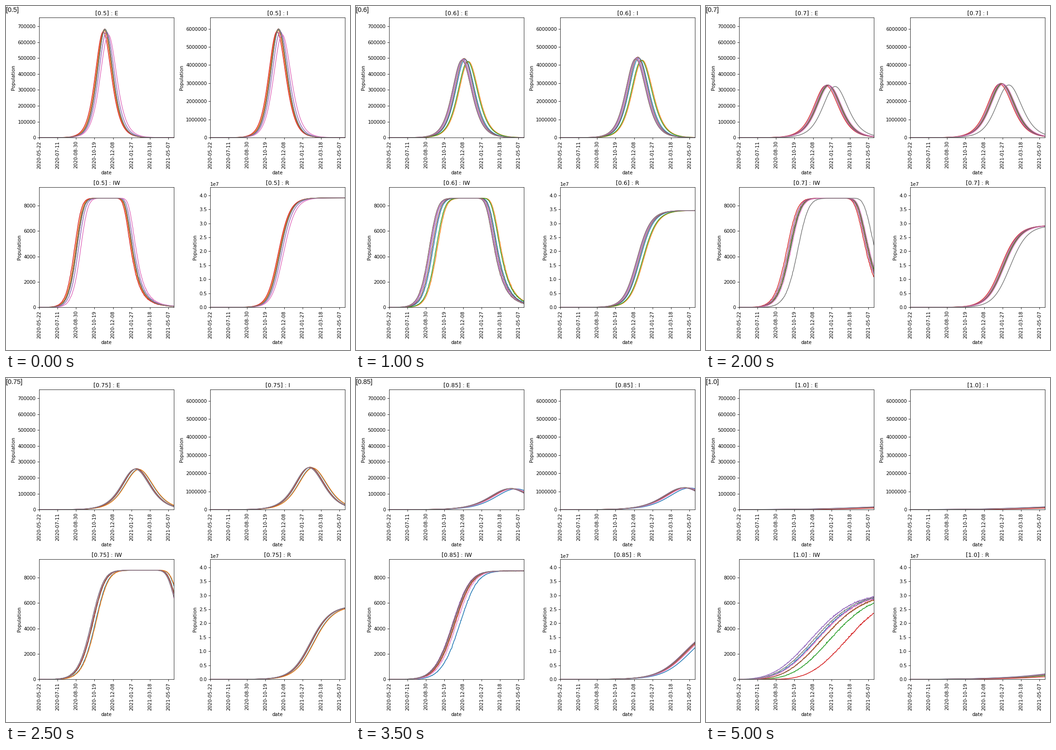
These frames come from a looping animation (748x748 px, 5.5 s). A matplotlib script:

```python
import numpy as np
import matplotlib.pyplot as plt
from matplotlib.animation import FuncAnimation

SIZE, DPI = 748, 74.8
POP, WARDS, RUNS = 56.08e6, 8588, 8
DAYS = np.arange(366)
LEVELS = np.round(np.linspace(0.5, 1.0, 11), 2)
PANELS = [("E", 755e3, 1e5), ("I", 6.62e6, 1e6), ("IW", 9448, 2000), ("R", 4.288e7, 5e6)]


def epidemic(r0, step=0.25, count=6400, sick=9.2):
    """SEIR with two infectious stages; returns time, E, I and R."""
    s, e, i1, i2, r = 1 - 2e-6, 1e-6, 1e-6, 0.0, 0.0
    out = np.empty((3, count))
    rate = 2 / sick
    for n in range(count):
        out[:, n] = e, i1 + i2, r
        new = r0 / sick * s * (i1 + i2)
        left, healed = rate * i1, rate * i2
        s -= step * new
        i1 += step * (e - left)
        e += step * (new - e)
        i2 += step * (left - healed)
        r += step * healed
    return np.arange(count) * step, out * POP


def saturate(x):
    """Rises from 0 to 1, a half at x = 1, with a sharp shoulder."""
    return 1 - (1 + 0.26 * x) ** -3


def wards(q, peak, delay, rng):
    """Number of wards with at least one infection."""
    lead = 300 * (0.5 - q)
    half = 0.56 * peak * (1 - 1.33 * q ** 3) + lead
    power = 0.81 * (0.095 - 0.153 * q) * half
    t = np.maximum(DAYS - 1.2 * delay, 0.5)
    rise = saturate(((t + lead) / half) ** power)
    after = np.maximum(DAYS - peak - delay, 1)
    fall = saturate(((0.43 + 0.15 * q) * peak / after) ** 5)
    share = rise * fall * (1 - 0.2 * (2 * q) ** 10)
    noise = rng.normal(0, 55, DAYS.size) * np.sqrt(share * (1 - share))
    return np.maximum(WARDS * share + noise, 0)


def simulate(level):
    """All runs of one level as an array [run, panel, day]."""
    q = level - 0.5
    rng = np.random.default_rng(int(100 * level))
    time, (e, i, r) = epidemic(1.71 - 1.65 * q + 0.82 * q ** 2)
    height = 684e3 * (1 - 2.764 * q + 0.505 * q ** 2 + 2.325 * q ** 3)
    scale, top = height / e.max(), time[e.argmax()]
    peak = 178 * np.exp(1.1 * q + 1.9 * q ** 2)
    runs = []
    for delay in rng.gumbel(0, 3.5 + 15 * (2 * q) ** 8, RUNS):
        # Early and late runs have a lower and wider peak
        k = scale * (1 - 0.006 * min(abs(delay), 9) * (1 - 2 * q))
        t = top + (DAYS - peak - delay) * k
        removed = np.interp(t, time, r)
        runs.append([k * np.interp(t, time, e), k * np.interp(t, time, i),
                     wards(q, peak, delay, rng), removed - removed[0]])
    return np.array(runs)


fig, grid = plt.subplots(
    2, 2, figsize=(SIZE / DPI, SIZE / DPI), dpi=DPI, facecolor="white",
    gridspec_kw=dict(left=72 / SIZE, right=737.1 / SIZE, top=1 - 25.2 / SIZE,
                     bottom=1 - 655.2 / SIZE, wspace=78.8 / 293.2, hspace=108 / 261))
corner = fig.text(0, 1 - 13.3 / SIZE, "", family="Liberation Sans", size=13.9)

marks = np.arange(0, 365, 50)
dates = [str(np.datetime64("2020-05-22") + int(d)) for d in marks]
lines = []
for ax, (name, top, tick) in zip(grid.flat, PANELS):
    ax.set(xlim=(0, 365), ylim=(0, top), xlabel="date", ylabel="Population")
    ax.set_xticks(marks, dates, rotation=90)
    ax.set_yticks(np.arange(0, top, tick))
    ax.ticklabel_format(axis="y", scilimits=(-7, 7))
    lines.append([ax.plot([], [], color=f"C{n}", lw=1.5)[0] for n in range(RUNS)])

results = [simulate(level) for level in LEVELS]


def update(idx):
    label = f"[{float(LEVELS[idx])}]"
    corner.set_text(label)
    for panel, ax in enumerate(grid.flat):
        ax.set_title(f"{label} : {PANELS[panel][0]}")
        for n, line in enumerate(lines[panel]):
            line.set_data(DAYS, results[idx][n, panel])
    return []


anim = FuncAnimation(fig, update, frames=len(LEVELS), interval=500,
                     repeat=True, repeat_delay=0)
plt.show()
```
